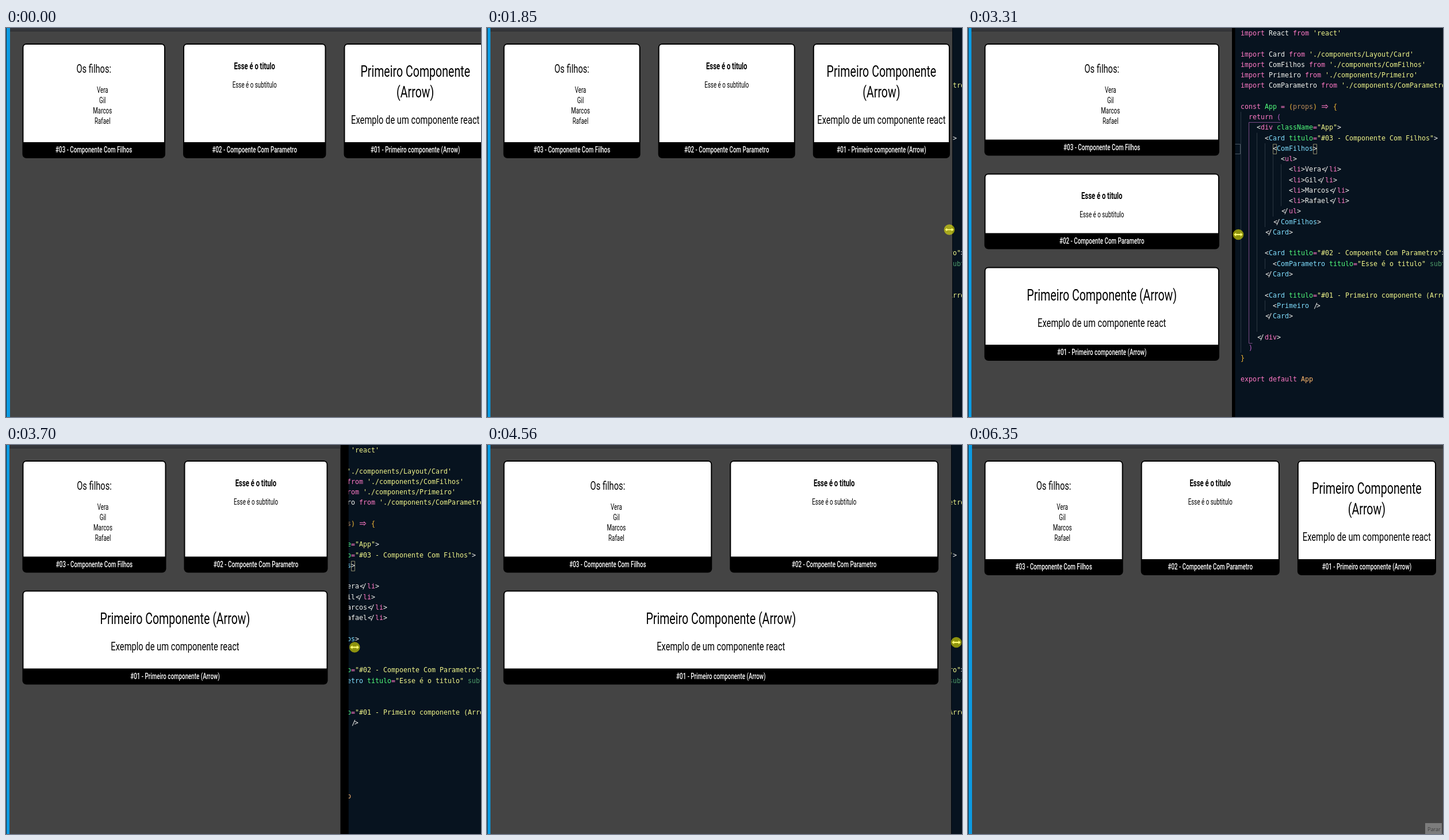
Animation of 826 by 678 pixels, one loop 6.41 s. Source, as an HTML page:

```html
<!DOCTYPE html>
<html lang="pt">
<head>
<meta charset="utf-8">
<title>Componentes</title>
<style>
  html, body { margin: 0; width: 100%; height: 100%; overflow: hidden; background: #07131f; }
  svg { display: block; }
  .page text { font-family: Roboto, sans-serif; text-anchor: middle; }
  .code text { font: 11.63px "DejaVu Sans Mono", monospace; white-space: pre; }
  .button text { font: 9px "Open Sans", sans-serif; }
</style>
</head>
<body>
<svg id="stage" width="826" height="678" viewBox="0 0 826 678"></svg>
<script>
const LOOP = 6410;
const NAMES = ['Vera', 'Gil', 'Marcos', 'Rafael'];
const stage = document.getElementById('stage');

function set(node, attrs) {
  for (const k in attrs) node.setAttribute(k, attrs[k]);
  return node;
}
function add(parent, tag, attrs, text) {
  const node = set(document.createElementNS('http://www.w3.org/2000/svg', tag), attrs || {});
  if (text !== undefined) node.textContent = text;
  parent.appendChild(node);
  return node;
}
const rect = (parent, x, y, width, height, fill, more) =>
  add(parent, 'rect', { x, y, width, height, fill, ...more });

// ---- Code editor: "~" starts a token, the next letter is its colour ----
const COLORS = {
  p: '#ff79c6', w: '#f2f2ee', y: '#f0f58a', c: '#80dfff', g: '#50fa7b',
  b: '#b98a58', o: '#ffb86c', d: '#f5b935', v: '#c061cb', s: '#4d9a68'
};
const ITALIC = 'cgbos';
const imp = (name, path) => `~pimport ~w${name} ~pfrom ~y'${path}'`;
const pad = n => ' '.repeat(n);
const tag = (n, name, color) => `${pad(n)}~w<~${color}${name}~w>`;
const close = (n, name, color) => `${pad(n)}~w</~${color}${name}~w>`;
const card = title => `${pad(6)}~w<~cCard ~gtitulo~p=~y"${title}"~w>`;
const SOURCE = [
  imp('React', 'react'),
  '',
  imp('Card', './components/Layout/Card'),
  imp('ComFilhos', './components/ComFilhos'),
  imp('Primeiro', './components/Primeiro'),
  imp('ComParametro', './components/ComParametro'),
  '',
  '~pconst ~tApp ~p= ~d(~bprops~d) ~p=> ~d{',
  '  ~preturn ~v(',
  '    ~w<~pdiv ~gclassName~p=~y"App"~w>',
  card('#03 - Componente Com Filhos'),
  tag(8, 'ComFilhos', 'c'),
  tag(10, 'ul', 'p'),
  ...NAMES.map(n => `${tag(12, 'li', 'p')}${n}~w</~pli~w>`),
  close(10, 'ul', 'p'),
  close(8, 'ComFilhos', 'c'),
  close(6, 'Card', 'c'),
  '',
  card('#02 - Compoente Com Parametro'),
  '        ~w<~cComParametro ~gtitulo~p=~y"Esse é o titulo" ~ssubtitulo~p=',
  close(6, 'Card', 'c'),
  '',
  card('#01 - Primeiro componente (Arrow)'),
  '        ~w<~cPrimeiro ~w/>',
  close(6, 'Card', 'c'),
  '',
  close(4, 'div', 'p'),
  '  ~v)',
  '~d}',
  '',
  '~pexport default ~oApp'
];
const LEFT = 474, CELL = 7, LINE = 18.26;

function buildCode() {
  const g = add(stage, 'g', { class: 'code' });
  rect(g, 0, 0, 826, 678, '#07131f');

  const guide = (col, from, to) =>
    rect(g, LEFT + col * CELL, from * LINE, 1, (to - from + 1) * LINE, '#2b3742');
  guide(0, 8, 30);
  guide(4, 10, 28);
  [[11, 18], [22, 22], [26, 26]].forEach(r => guide(6, ...r));
  guide(8, 12, 17);
  guide(10, 13, 16);
  const line = (d, stroke) => add(g, 'path', { d, stroke, fill: 'none' });
  line('M543.5 164.5H488.5V549.5H494.5', '#7a4a86');
  line('M464 202.5H473.5V219.5H464', '#4c5964');
  for (const x of [530.5, 600.5]) line(`M${x} 202.5h6v17h-6z`, '#8d8b6c');

  SOURCE.forEach((row, i) => {
    const y = 13 + i * LINE;
    const parts = row.split('~');
    let col = parts[0].length;
    for (const part of parts.slice(1)) {
      const key = part[0], str = part.slice(1);
      const attrs = { x: LEFT + col * CELL, y, fill: COLORS[key] || COLORS.g };
      if (ITALIC.includes(key)) attrs['font-style'] = 'italic';
      if (str === '</' || str === '/>') {
        attrs.x += 1.3;
        attrs['letter-spacing'] = -2.6;
      }
      if (str === '=> ') {
        const x = attrs.x;
        line(`M${x + 1} ${y - 5.5}h9M${x + 1} ${y - 2.5}h9M${x + 8} ${y - 7.5}l4 3.5l-4 3.5`, COLORS.p);
      } else {
        add(g, 'text', attrs, str);
      }
      col += str.length;
    }
  });
}

// ---- Web page with the cards ----
const BASE = 14;
const label = (parent, str, x, y, size = BASE, weight = 400, fill = '#000') =>
  add(parent, 'text', {
    transform: `translate(${x} ${y}) scale(.7 1)`,
    'font-size': size, 'font-weight': weight, fill
  }, str);

function buildCard(parent, title) {
  const g = add(parent, 'g');
  const box = rect(g, 0, 0, 0, 0, '#000', { rx: 7 });
  const sheet = add(g, 'path', { fill: '#fff' });
  const foot = add(g, 'g');
  label(foot, title, 0, -10, BASE, 500, '#fff');
  return { g, box, sheet, foot };
}

function placeCard(c, x, y, w, h) {
  const r = w / 2;
  set(c.g, { transform: `translate(${x + r} ${y})` });
  set(c.box, { x: -r, width: w, height: h });
  set(c.sheet, { d: `M${2 - r} ${h - 28}V7q0-5 5-5H${r - 7}q5 0 5 5V${h - 28}z` });
  set(c.foot, { transform: `translate(0 ${h})` });
}

buildCode();
const gap = rect(stage, 0, 0, 0, 678, '#000');
const page = add(stage, 'svg', { class: 'page', height: 678, overflow: 'hidden' });
rect(page, 0, 0, 900, 678, '#444');
rect(page, 0, 0, 900, 5, '#35363a');
rect(page, 0, 5, 900, 1, '#2c2d30');
const bar = rect(page, 1, 0, 6, 678, '#0b9be3');
rect(page, 0, 0, 1, 678, '#1d2730');

const cards = [
  '#03 - Componente Com Filhos',
  '#02 - Compoente Com Parametro',
  '#01 - Primeiro componente (Arrow)'
].map(t => buildCard(page, t));

label(cards[0].g, 'Os filhos:', 0, 50.5, 21);
NAMES.forEach((n, i) => label(cards[0].g, n, 15, 85.5 + i * 18.2));
label(cards[1].g, 'Esse é o titulo', 0, 44.5, 16.2, 700);
label(cards[1].g, 'Esse é o subtitulo', 0, 76.5);
const wide = add(cards[2].g, 'g');
label(wide, 'Primeiro Componente (Arrow)', 0, 58.5, 28);
label(wide, 'Exemplo de um componente react', 0, 104.5, 21);
const tall = add(cards[2].g, 'g');
label(tall, 'Primeiro Componente', 0, 58, 28);
label(tall, '(Arrow)', 0, 94, 28);
label(tall, 'Exemplo de um componente react', 0, 139.5, 21);

// Wrapping row of cards whose right end is at x = end
function layout(end) {
  const x0 = 28.5, space = 31;
  const cols = end >= 795 ? 3 : end >= 529 ? 2 : 1;
  const width = n => (end - x0 - space * (n - 1)) / n;
  const w = width(cols), step = w + space;
  if (cols === 3) {
    cards.forEach((c, i) => placeCard(c, x0 + i * step, 27, w, 200));
  } else if (cols === 2) {
    placeCard(cards[0], x0, 27, w, 195.5);
    placeCard(cards[1], x0 + step, 27, w, 195.5);
    placeCard(cards[2], x0, 253.5, width(1), 164);
  } else {
    placeCard(cards[0], x0, 27, w, 195.5);
    placeCard(cards[1], x0, 253.5, w, 132);
    placeCard(cards[2], x0, 416.5, w, 163.5);
  }
  set(wide, { display: cols < 3 ? 'inline' : 'none' });
  set(tall, { display: cols < 3 ? 'none' : 'inline' });
}

// ---- Stop button and mouse ----
const button = add(stage, 'g', { class: 'button' });
rect(button, 795, 659, 29, 19, '#7c7c7c');
add(button, 'text', { x: 799, y: 673, fill: '#3d3d3d' }, 'Parar');

const mouse = add(stage, 'g');
const resize = add(mouse, 'path', {
  d: 'M-8 0l4.5-4v2.5h7v-2.5l4.5 4l-4.5 4v-2.5h-7v2.5z',
  fill: '#fff', stroke: '#222', 'stroke-width': .9
});
const pointer = add(mouse, 'path', {
  d: 'M0 0v12l3-2.5l2 4.5l2-1l-2-4.3h4z',
  fill: '#fff', stroke: '#222', 'stroke-width': .9
});
add(mouse, 'circle', { r: 9.3, fill: '#ff0', 'fill-opacity': .54 });

// ---- Timeline ----
// time, page edge, editor edge, card end, mouse x, mouse y
const DRAG = [
  [1220, 856, 856, 834, 860, 350],
  [1520, 856, 856, 834, 850, 350],
  [1840, 809, 809, 805, 804, 351.5],
  [2240, 701, 701, 709, 688, 353],
  [2474, 553, 553, 563, 535, 354],
  [2860, 454, 454, 432, 452, 359],
  [3231, 454, 454, 432, 452, 359],
  [3310, 459, 464, 437, 470, 360],
  [3940, 655, 674, 633, 688, 348],
  [4097, 712, 731, 690, 747, 346],
  [4562, 807, 807, 785, 816, 344],
  [4640, 820, 820, 798, 829, 344],
  [4790, 836, 836, 814, 850, 344]
];
// start, end and count of the picture steps
const STEPS = [
  [1600, 2240, 9], [2320, 2860, 8], [3310, 3940, 9], [4020, 4640, 9],
  [4720, 4790, 2], [5490, 5870, 6], [6100, 6350, 4]
];

function snap(t) {
  let out = t < 1220 ? 0 : 1220;
  for (const [a, b, n] of STEPS) {
    if (t < a) break;
    const d = (b - a) / (n - 1);
    out = Math.min(b, a + Math.floor((t - a) / d + .15) * d);
  }
  return out;
}

function dragAt(t) {
  if (t < 1220) return [0, 858, 858, 836, 870, 350];
  const i = DRAG.findIndex(k => k[0] > t);
  if (i < 0) return DRAG[DRAG.length - 1];
  const a = DRAG[i - 1], b = DRAG[i], f = (t - a[0]) / (b[0] - a[0]);
  return a.map((v, j) => v + (b[j] - v) * f);
}

function draw(now) {
  const t = now % LOOP, s = snap(t);
  let [, edge, code, end, mx, my] = dragAt(s);
  set(page, { width: edge });
  set(gap, { x: edge - 1, width: code - edge + 1.5 });
  layout(end);
  set(bar, { width: t >= 990 && t < 6100 ? 5 : 6 });

  const leaving = s >= 5490;
  if (leaving) {
    const f = Math.min(1, (s - 5490) / 380);
    mx = 826 - 14 * f;
    my = 449 + 245 * f;
  }
  set(mouse, { transform: `translate(${mx} ${my})` });
  set(resize, { display: leaving ? 'none' : 'inline' });
  set(pointer, { display: leaving ? 'inline' : 'none' });
  set(button, { opacity: s < 6100 ? 0 : Math.min(1, .25 + (s - 6100) / 333) });
}

function tick(now) {
  draw(now);
  requestAnimationFrame(tick);
}
draw(0);
requestAnimationFrame(tick);
</script>
</body>
</html>
```
